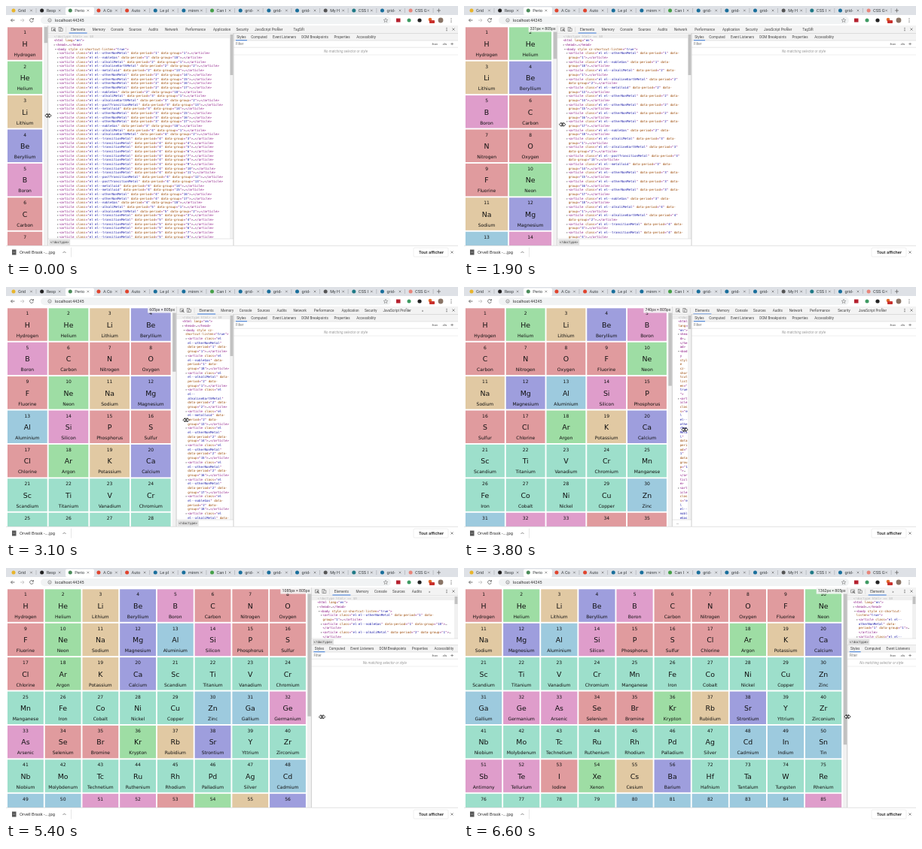
An HTML page that plays this animation: 600 px wide and 337 px high, repeating every 6.7 s.

```html
<!DOCTYPE html>
<html lang="en">
<head>
<meta charset="utf-8">
<title>Responsive periodic table</title>
<style>
html, body { margin: 0; width: 100%; height: 100%; overflow: hidden; background: #fff; }
svg { display: block; width: 100vw; height: 100vh; }
text { font-family: Roboto, "Open Sans", sans-serif; }
.cell text { font-family: "DejaVu Sans", Verdana, sans-serif; text-anchor: middle; fill: #111; }
.tree text { font-family: "DejaVu Sans Mono", monospace; font-size: 4.15px; }
</style>
</head>
<body>
<svg viewBox="0 0 600 337" preserveAspectRatio="none">
  <clipPath id="page"><rect id="pageClip" y="26" height="293"/></clipPath>
  <clipPath id="tree"><rect id="treeClip" y="36.5"/></clipPath>
  <g id="view"></g>
  <g id="chrome"></g>
  <g id="cursor">
    <path d="M-4.2 0L-1.6 -2.6V-1H1.6V-2.6L4.2 0L1.6 2.6V1H-1.6V2.6Z" fill="#fff" stroke="#111" stroke-width=".8"/>
    <path d="M0 -2.6V2.6" stroke="#111" stroke-width=".7"/>
  </g>
</svg>
<script>
const LOOP = 6700, STEP = 100, SCALE = 0.3735;
const $ = id => document.getElementById(id);

const times   = [0, 1200, 2500, 3800, 4800, 5900, 6600];
const widths  = [149, 198, 483, 740, 912, 1230, 1362];
const cursorX = [56, 78, 190, 293, 360, 467, 509];
const cursorY = [146, 151, 166, 190, 200, 197, 198];

const symbols = ('H He Li Be B C N O F Ne Na Mg Al Si P S Cl Ar K Ca Sc Ti V Cr Mn Fe Co Ni Cu Zn Ga Ge As Se Br Kr ' +
  'Rb Sr Y Zr Nb Mo Tc Ru Rh Pd Ag Cd In Sn Sb Te I Xe Cs Ba Hf Ta W Re Os Ir Pt Au Hg Tl Pb Bi Po At Rn').split(' ');
const names = ('Hydrogen Helium Lithium Beryllium Boron Carbon Nitrogen Oxygen Fluorine Neon Sodium Magnesium Aluminium ' +
  'Silicon Phosphorus Sulfur Chlorine Argon Potassium Calcium Scandium Titanium Vanadium Chromium Manganese Iron ' +
  'Cobalt Nickel Copper Zinc Gallium Germanium Arsenic Selenium Bromine Krypton Rubidium Strontium Yttrium ' +
  'Zirconium Niobium Molybdenum Technetium Ruthenium Rhodium Palladium Silver Cadmium Indium Tin Antimony ' +
  'Tellurium Iodine Xenon Cesium Barium Hafnium Tantalum Tungsten Rhenium Osmium Iridium Platinum Gold Mercury ' +
  'Thallium Lead Bismuth Polonium Astatine Radon').split(' ');
const m = n => 'm'.repeat(n);
const kinds = 'rg' + 'tvprrrrg' + 'tvbprrrg' + 'tv' + m(9) + 'bbpprrg' + 'tv' + m(9) + 'bbbpprg' + 'tv' + m(8) + 'bbbbbpg';
const types = {
  r: ['#e09b9e', 'otherNonMetal'], g: ['#9edda4', 'nobleGas'], t: ['#e1c9a3', 'alkaliMetal'],
  v: ['#9e9edd', 'alkalineEarthMetal'], p: ['#df9dcb', 'metalloid'],
  b: ['#9dcade', 'postTransitionMetal'], m: ['#9ddfcb', 'transitionMetal']
};

const esc = s => s.replace(/&/g, '&amp;').replace(/</g, '&lt;').replace(/ /g, '\u00a0');
const rect = (x, y, w, h, fill, extra = '') =>
  `<rect x="${x}" y="${y}" width="${Math.max(0, w)}" height="${Math.max(0, h)}" fill="${fill}" ${extra}/>`;
const text = (x, y, s, size, fill = '#333', extra = '') =>
  `<text x="${x}" y="${y}" font-size="${size}" fill="${fill}" ${extra}>${esc(s)}</text>`;
const line = (d, stroke = '#ccc', w = .5) => `<path d="${d}" fill="none" stroke="${stroke}" stroke-width="${w}"/>`;
const dot = (x, y, r, fill) => `<circle cx="${x}" cy="${y}" r="${r}" fill="${fill}"/>`;
const cross = (x, y, r, c = '#666') => line(`M${x - r} ${y - r}l${2 * r} ${2 * r}m0 ${-2 * r}l${-2 * r} ${2 * r}`, c, .6);
const MID = 'text-anchor="middle"';

// Monotone cubic interpolation.
function at(t, ys) {
  const slope = i => (ys[i + 1] - ys[i]) / (times[i + 1] - times[i]);
  const tangent = i => {
    if (i === 0) return 0;
    if (i === ys.length - 1) return slope(i - 1);
    const a = slope(i - 1), b = slope(i);
    return a * b <= 0 ? 0 : 2 * a * b / (a + b);
  };
  let i = 0;
  while (i < ys.length - 2 && t >= times[i + 1]) i++;
  const h = times[i + 1] - times[i], u = (t - times[i]) / h, v = 1 - u;
  return ys[i] * (1 + 2 * u) * v * v + h * tangent(i) * u * v * v +
    ys[i + 1] * u * u * (3 - 2 * u) - h * tangent(i + 1) * u * u * v;
}

function browserChrome() {
  const tabs = ['Grid', 'Resp', 'Perio', 'A Co', 'Auto', 'Le pl', 'minm', 'Can I', 'grid-', 'grid-', 'grid-', 'My H', 'CSS I', 'grid-', 'CSS G'];
  const icons = ['#e8b52c', '#222', '#4b8b5a', '#e0442e', '#e0442e', '#1a6f9c', '#1a6f9c', '#46a049',
    '#1a6f9c', '#1a6f9c', '#1a6f9c', '#555', '#207a86', '#1a6f9c', '#e8857a'];
  let s = rect(0, 0, 600, 12, '#dee1e6') + rect(0, 12, 600, 14, '#fff');
  s += rect(79, 1.5, 38, 10.5, '#fff', 'rx="2"');
  tabs.forEach((label, i) => {
    const x = 10 + 37.65 * i;
    s += dot(x, 6, 2.5, icons[i]) + text(x + 6, 8, label, 5.6, '#3c4043') + cross(x + 23.5, 6, 1.3);
    if (i !== 1 && i !== 2) s += line(`M${x + 30} 3v6`, '#9a9da2');
  });
  s += line('M572 6h5m-2.5 -2.5v5', '#555', .7);
  s += line('M11.5 19h-5m2.2 -2.2l-2.2 2.2l2.2 2.2', '#555', .8);
  s += line('M19 19h5m-2.2 -2.2l2.2 2.2l-2.2 2.2', '#bbb', .8);
  s += line('M36 17.6a2.4 2.4 0 1 0 .3 2M36.4 16v2h-2', '#555', .8);
  s += rect(46, 14, 465, 10, '#f1f3f4', 'rx="5"');
  s += '<circle cx="58" cy="19" r="2.2" fill="none" stroke="#666" stroke-width=".6"/>' + line('M58 18.6v1.6', '#666', .6);
  s += text(65, 21, 'localhost:44245', 5.4, '#333');
  s += '<path d="M504 16.3l.8 1.9 2 .1-1.6 1.3.6 2-1.8-1.1-1.8 1.1.6-2-1.6-1.3 2-.1z" fill="none" stroke="#666" stroke-width=".5"/>';
  s += rect(518, 16.5, 5.5, 5, '#b5202e') + dot(535, 19, 2.5, '#3f9a63') + dot(549, 19, 2.6, '#222');
  s += dot(563, 18, 2.3, '#e06a2a') + rect(562, 19, 7, 4, '#c9302c', 'rx=".8"') + dot(577, 19, 3.4, '#8a7466');
  s += [16.8, 19, 21.2].map(y => dot(591, y, .6, '#555')).join('');

  s += rect(0, 319, 600, 18, '#fff') + line('M0 319.3H600', '#c4c4c4');
  s += rect(8, 324.5, 5.5, 7, '#555') + line('M9.2 328h3', '#ddd');
  s += text(18, 330.3, 'Orvell Brask -….jpg', 5.8) + line('M75.5 329l2 -2l2 2', '#555', .7) + line('M86.5 321.5v13', '#ccc');
  s += rect(541, 322, 46, 12, '#fff', 'rx="1.5" stroke="#ddd" stroke-width=".5"');
  s += text(564.5, 330.2, 'Tout afficher', 5.9, '#222', MID + ' font-weight="500"') + cross(592, 328, 1.5, '#444');
  return s;
}

function grid(w) {
  const gap = 1.9, left = 2, top = 28.3, pitchY = 45.4, room = w - 7.5 - left;
  const cols = Math.max(1, Math.floor((room + gap) / 48.3));
  const pitch = (room + gap) / cols, cw = pitch - gap;
  let s = '';
  for (let i = 0; i < Math.min(names.length, cols * 7); i++) {
    const x = left + i % cols * pitch, y = top + Math.floor(i / cols) * pitchY, c = x + cw / 2;
    s += rect(x, y, cw, pitchY - gap, types[kinds[i]][0]) +
      text(c, y + 9, String(i < 56 ? i + 1 : i + 16), 6) +
      text(c, y + 25.4, symbols[i], 9.4) + text(c, y + 38.4, names[i], 6);
  }
  const thumb = 291 * 291 / (Math.ceil(88 / cols) * pitchY);
  return `<g class="cell" clip-path="url(#page)">${s}</g>` +
    rect(w - 5.6, 26, 5.6, 293, '#f1f1f1') + rect(w - 5, 28, 4.4, thumb, '#c1c1c1');
}

function article(i) {
  const starts = [0, 2, 10, 18, 36, 54];
  const p = starts.filter(n => n <= i).length, off = i - starts[p - 1];
  let group = off + 1;
  if (p === 1 && off) group = 18;
  else if ((p === 2 || p === 3) && off > 1) group = off + 11;
  else if (p === 6 && off > 1) group = off + 2;
  return `<article class="el el--${types[kinds[i]][1]}" data-period="${p}" data-group="${group}">…</article>`;
}

const source = [
  [8, '', '<html lang="en">'], [10.5, '▸', '<head>…</head>'],
  [12, '▾', '<body style cz-shortcut-listen="true">'],
  ...names.map((_, i) => [15, '▸', article(i)])
];
const ink = { tag: '#881280', name: '#994500', value: '#1a1aa6', dots: '#444' };

function inks(s) {
  const out = Array(s.length).fill('tag');
  for (const a of s.matchAll(/ ([\w-]+)(="[^"]*")?/g)) {
    const start = a.index + 1, end = start + a[1].length;
    out.fill('name', start, end);
    if (a[2]) out.fill('value', end + 2, end + a[2].length - 1);
  }
  if (s.includes('…')) out[s.indexOf('…')] = 'dots';
  return out;
}

function wrap(s, cols) {
  const rows = [];
  let start = 0, pos = 0;
  for (const piece of s.match(/[^ \-…]*[ \-…]+|[^ \-…]+/g)) {
    const len = piece.trimEnd().length;
    if (pos > start && pos - start + len > cols) { rows.push([start, pos]); start = pos; }
    pos += piece.length;
    while (pos - start > cols + 1) { rows.push([start, start + cols]); start += cols; }
  }
  if (pos > start) rows.push([start, pos]);
  return rows;
}

function tree(w, right, bottom) {
  const pane = right - w, sliver = pane < 12, advance = 2.5, rowH = 5.68;
  let y = sliver ? 132 : 47.4, s = '';
  const last = sliver ? 206 : bottom + 4;
  if (!sliver) {
    s += rect(w, 37.5, pane, 5.4, '#efefef') + text(w + 8, 41.8, '<!doctype html> == $0', 4.15, '#b5b5b5');
  }
  for (const [depth, arrow, code] of sliver ? source.slice(3) : source) {
    if (y > last) break;
    const x = w + Math.min(depth, pane * .4), colors = inks(code);
    if (arrow && !sliver) s += text(x - 3, y, arrow, 4.15, '#666');
    for (const [from, to] of wrap(code, Math.max(1, Math.floor((right - 5 - x) / advance)))) {
      if (y > last) break;
      for (let i = from; i < to;) {
        let j = i + 1;
        while (j < to && colors[j] === colors[i]) j++;
        s += text(x + (i - from) * advance, y, code.slice(i, j), 4.15, ink[colors[i]]);
        i = j;
      }
      y += rowH;
    }
  }
  return `<g class="tree" clip-path="url(#tree)">${s}</g>`;
}

function tabRow(x, y, limit, tabs) {
  let s = '';
  for (const [label, offset, width] of tabs) {
    if (x + offset + width / 2 > limit) {
      return s + text(x + offset - width / 2 + 1, y, '»', 5, '#555');
    }
    s += text(x + offset, y, label, 4.6, '#444', MID);
  }
  return s;
}

function devtools(w) {
  const stacked = w > 376, side = stacked ? w : Math.max(302, w + 9);
  const right = stacked ? 600 : side, bottom = stacked ? 94 : 310, y0 = stacked ? 102.5 : 36.5;
  const thin = w > 230;
  const tabs = [['Elements', 40, 20], ['Memory', 67.5, 18], ['Console', 92, 19], ['Sources', 116, 18],
    ['Audits', 140, 15], ['Network', 164, 19], ['Performance', 196, 27]]
    .concat(thin ? [['Security', 228, 19], ['JavaScript Profiler', 266, 42]]
      : [['Application', 231, 25], ['Security', 258, 19], ['JavaScript Profiler', 293, 39], ['TagSift', 333, 17]]);
  $('treeClip').setAttribute('x', w);
  $('treeClip').setAttribute('width', right - w);
  $('treeClip').setAttribute('height', bottom - 36.5);

  let s = rect(w, 26, 600 - w, 293, '#fff') + tree(w, right, bottom);
  // Scrollbar and breadcrumb of the element tree
  if (right - w > 12) {
    s += rect(right - 5, 37, 5, bottom - 37, '#f1f1f1') + rect(right - 4.4, 38, 3.8, stacked ? 10 : thin ? 18 : 54, '#c1c1c1');
  }
  const crumbH = stacked ? 8.5 : 9;
  s += rect(w, bottom, right - w, crumbH, '#fff') + line(`M${w} ${bottom}H${right}`);
  if (right - w > 40) {
    s += rect(w + 1.5, bottom + 1, 28, crumbH - 1.5, '#e0e0e0') +
      `<g class="tree">${text(w + 3, bottom + 5.9, '<!doctype>', 4.15, '#333')}</g>`;
  } else if (right - w > 12) s += text(w + 5, bottom + 6, '…', 5);

  // Toolbar
  s += rect(w, 26, 600 - w, 10.5, '#f3f3f3') + line(`M${w} 36.5H600`);
  s += rect(w + 5, 29, 4.5, 4, 'none', 'stroke="#666" stroke-width=".6"') + line(`M${w + 10.5} 34l-3 -3m0 2v-2h2`, '#444', .7);
  s += rect(w + 14.5, 28.6, 3, 5, 'none', 'stroke="#666" stroke-width=".6"') + rect(w + 16.5, 30, 3, 3.6, '#f3f3f3', 'stroke="#666" stroke-width=".6"');
  s += line(`M${w + 24} 28v7`) + tabRow(w, 32.8, 563.5, tabs);
  s += line(`M${w + 28} 36h24`, '#3879d9', 1);
  s += [29.3, 31, 32.7].map(y => dot(585, y, .6, '#555')).join('') + cross(594, 31, 1.6, '#555');

  // Styles pane
  s += rect(side, y0, 600 - side, 9.5, '#f3f3f3') + line(`M${side} ${y0}H600M${side} ${y0 + 9.5}H600M${side} ${y0 + 18.7}H600`);
  s += tabRow(side, y0 + 6.2, 595, [['Styles', 10.5, 13], ['Computed', 34, 21], ['Event Listeners', 67.5, 32],
    ['DOM Breakpoints', 108, 36], ['Properties', 144, 22], ['Accessibility', 176, 26]]);
  s += line(`M${side + 3} ${y0 + 9.2}h15`, '#3879d9', 1);
  s += text(side + 3, y0 + 15.6, 'Filter', 4.6, '#777');
  s += text(569, y0 + 15.4, ':hov', 4.4, '#444', MID) + text(582, y0 + 15.4, '.cls', 4.4, '#444', MID) + line(`M590.3 ${y0 + 14}h3.6m-1.8 -1.8v3.6`, '#555', .6);
  s += text((side + 600) / 2, y0 + 25.2, 'No matching selector or style', 4.6, '#999', MID + ' font-style="italic"');
  s += line(`M${side} ${y0 + 28.5}H600`, '#ddd');
  if (!stacked) s += line(`M${side} 36.5V319`, '#bbb', .7);
  return s + line(`M${w} 26V319`, '#bbb', .7);
}

function sizeLabel(w, px) {
  const label = `${px}px × 805px`, width = px > 999 ? 41 : 38;
  return rect(w - width, 26, width, 8.5, '#f7f7f7', 'fill-opacity=".9"') + text(w - width / 2, 32.2, label, 5.2, '#333', MID);
}

function draw(t) {
  const px = at(t, widths), w = px * SCALE;
  $('pageClip').setAttribute('width', w);
  $('view').innerHTML = grid(w) + devtools(w) + (t >= 300 ? sizeLabel(w, Math.round(px)) : '');
  $('cursor').setAttribute('transform', `translate(${at(t, cursorX)} ${at(t, cursorY)})`);
}

$('chrome').innerHTML = browserChrome();
const began = performance.now();
let shown = -1;
function tick() {
  const t = Math.floor((performance.now() - began) % LOOP / STEP) * STEP;
  if (t !== shown) draw(shown = t);
  requestAnimationFrame(tick);
}
tick();
</script>
</body>
</html>
```
